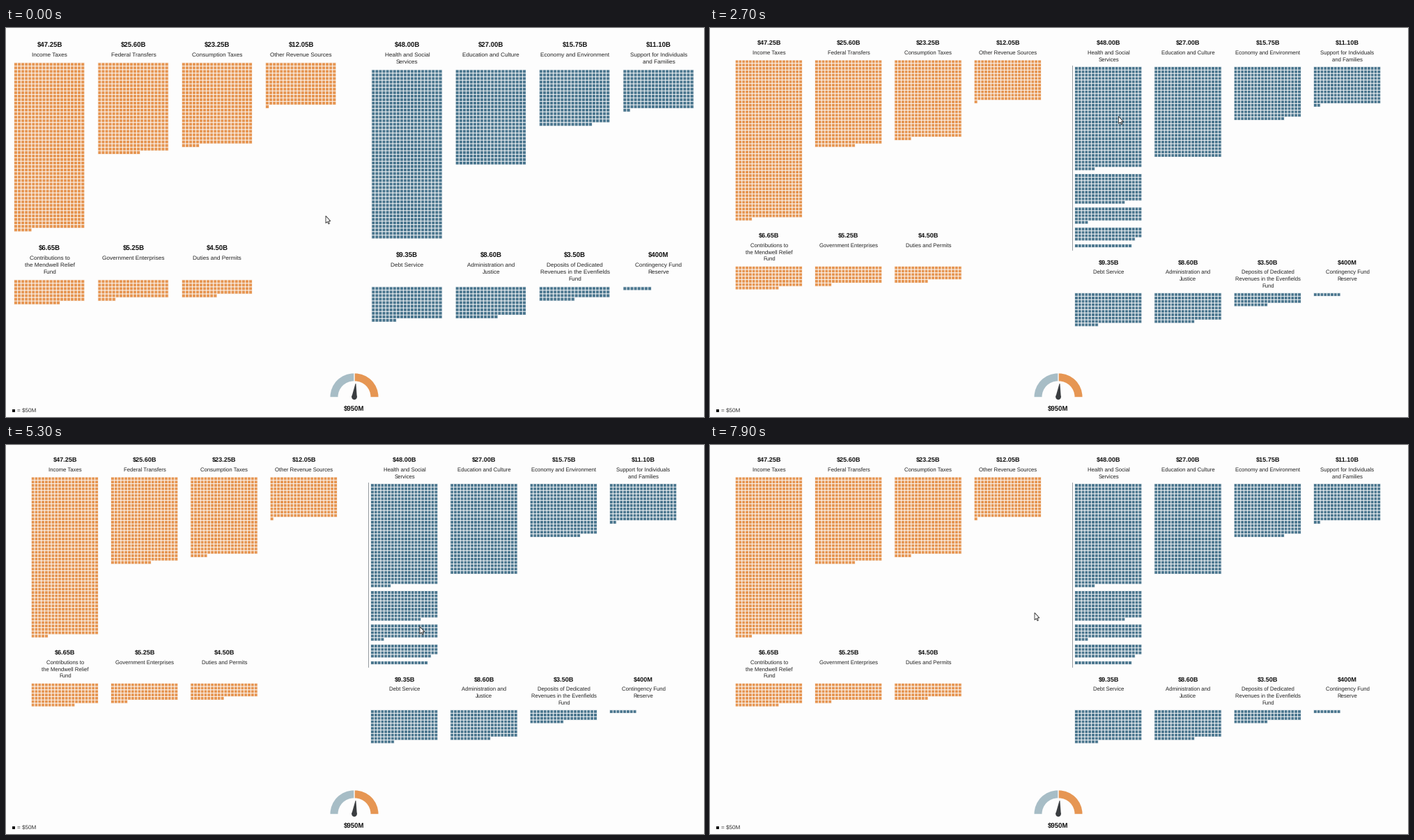
A matplotlib script for the animation above (8000 ms loop, 1002 by 559 pixels).

```python
import numpy as np
import matplotlib.pyplot as plt
from matplotlib.animation import FuncAnimation
from matplotlib.collections import PolyCollection
from matplotlib.patches import Circle, FancyBboxPatch, Polygon, Rectangle, Wedge

W, H, DPI = 1002, 559, 64
PX = 72 / DPI
STEP, LOOP = 100, 8000
COLS = 20

BG, ORANGE, BLUE, PALE = "#fdfdfd", "#e69653", "#4c778f", "#a7bdc6"
GREY, DARK, TIP = "#a8a7aa", "#3a3d40", "#212326"

plt.rcParams["font.family"] = "Liberation Sans"
plt.rcParams["text.hinting"] = "none"

# (amount, squares, label lines) for each row of each side
LEFT = [
    [("$47.25B", 945, ["Income Taxes"]),
     ("$25.60B", 512, ["Federal Transfers"]),
     ("$23.25B", 465, ["Consumption Taxes"]),
     ("$12.05B", 241, ["Other Revenue Sources"])],
    [("$6.65B", 133, ["Contributions to", "the Mendwell Relief", "Fund"]),
     ("$5.25B", 105, ["Government Enterprises"]),
     ("$4.50B", 90, ["Duties and Permits"])],
]
RIGHT = [
    [("$48.00B", 960, ["Health and Social", "Services"]),
     ("$27.00B", 540, ["Education and Culture"]),
     ("$15.75B", 315, ["Economy and Environment"]),
     ("$11.10B", 222, ["Support for Individuals", "and Families"])],
    [("$9.35B", 187, ["Debt Service"]),
     ("$8.60B", 172, ["Administration and", "Justice"]),
     ("$3.50B", 70, ["Deposits of Dedicated", "Revenues in the Evenfields", "Fund"]),
     ("$400M", 8, ["Contingency Fund", "Reserve"])],
]
# side data, colour, x before/after zoom, amount y before/after zoom per row
SIDES = [
    (LEFT, ORANGE, (12.0, 36.7), [(23.7, 21.2), (315.5, 298.2)]),
    (RIGHT, BLUE, (525.3, 524.0), [(23.7, 21.2), (325.5, 336.7)]),
]
PITCH, STRIDE = (5.06, 4.81), (120.35, 114.3)

SECTIONS = [606, 175, 84, 78, 17]
STARTS = np.cumsum([0] + SECTIONS[:-1])
TIPS = {0: ("Health and Social Services Institutions ($30.30B)", 170),
        3: ("Others ($3.90B)", 61)}

# start and length of the split, the zoom and the slide of the lower row
SPLIT, ZOOM, SLIDE = (1790, 750), (1950, 800), (1900, 840)

# time, x, y of the pointer
PATH = np.array([
    (0, 459, 270), (500, 459, 270), (1300, 586, 127), (4100, 587, 127),
    (5300, 594, 261), (5900, 594, 290), (6700, 594, 290), (7500, 466, 241),
    (LOOP, 466, 241)], float)


def ease(t, start, length):
    x = np.clip((t - start) / length, 0, 1)
    return 4 * x**3 if x < 0.5 else 1 - 4 * (1 - x)**3


def lerp(pair, p):
    return pair[0] + (pair[1] - pair[0]) * p


def pointer(t):
    i = min(np.searchsorted(PATH[:, 0], t, side="right") - 1, len(PATH) - 2)
    a, b = PATH[i], PATH[i + 1]
    u = (t - a[0]) / (b[0] - a[0])
    return a[1:] + (b[1:] - a[1:]) * u * u * (3 - 2 * u)


def grid(n):
    k = np.arange(n)
    return np.column_stack([k % COLS, k // COLS]).astype(float)


def section_rows(q):
    """Top row of every section as the tall block splits apart."""
    heights = [-(-n // COLS) + 1 for n in SECTIONS]
    apart = np.cumsum([0] + heights[:-1])
    return lerp((STARTS // COLS, apart), q)


def split_grid(q):
    """Sections drift apart; each one's tail flies up to fill its first row."""
    still, flying = [], []
    for start, n, top in zip(STARTS, SECTIONS, section_rows(q)):
        c = start % COLS
        cells = grid(c + n)[c:]
        cells[n - c:] = lerp((cells[n - c:], grid(c)), q)
        cells[:, 1] += top
        still.append(cells[:n - c])
        flying.append(cells[n - c:])
    return np.concatenate(still + flying)


def squares(cells, x, y, s):
    corners = np.array([(0, 0), (1, 0), (1, 1), (0, 1)])
    return (cells[:, None, :] + corners) * s + (x - 0.4, y - 0.4)


def outline(n, x, y, s):
    full, rest = divmod(n, COLS)
    x0, y0 = x - 0.6, y - 0.6
    x1, y1 = x0 + COLS * s + 0.6, y0 + full * s + 0.6
    pts = [(x0, y0), (x1, y0), (x1, y1)]
    if rest:
        xm = x0 + rest * s + 0.6
        pts += [(xm, y1), (xm, y1 + s), (x0, y1 + s)]
    else:
        pts += [(x0, y1)]
    return pts


fig = plt.figure(figsize=(W / DPI, H / DPI), dpi=DPI, facecolor=BG)
ax = fig.add_axes([0, 0, 1, 1])
ax.set_xlim(0, W)
ax.set_ylim(H, 0)
ax.axis("off")


def text(x, y, s, size, **kw):
    return ax.text(x, y, s, fontsize=size * PX, va="baseline", **kw)


def cell_set(color):
    c = PolyCollection([], facecolor=color, edgecolor=BG, linewidth=0.78 * PX)
    c.set_snap(False)
    return ax.add_collection(c, autolim=False)


blocks = []
for side, (rows, color, _, _) in enumerate(SIDES):
    for r, row in enumerate(rows):
        depth = max(len(item[2]) for item in row)
        for col, (amount, n, lines) in enumerate(row):
            blocks.append(dict(
                side=side, row=r, col=col, n=n, depth=depth, cells=cell_set(color),
                amount=text(0, 0, amount, 9.65, weight="bold", ha="center", color="#111"),
                lines=[text(0, 0, s, 8.2, ha="center", color="#222") for s in lines]))
health = next(b for b in blocks if b["n"] == 960)

# legend
ax.add_patch(Rectangle((9.3, 547.5), 4.2, 4.2, color="#111", lw=0))
text(15.8, 552.3, "= $50M", 8.15, color="#333")

# gauge
ax.add_patch(Wedge((499.3, 530.2), 33.8, 180, 270, width=11, color=PALE, lw=0))
ax.add_patch(Wedge((500.7, 530.2), 33.8, 270, 360, width=11, color=ORANGE, lw=0))
ax.add_patch(Circle((500, 530.3), 3.8, color=DARK, lw=0))
ax.add_patch(Polygon([(496.2, 530), (501.6, 511), (502.4, 511), (503.8, 530.6)], color=DARK, lw=0))
text(500, 550.4, "$950M", 9.65, weight="bold", ha="center", color="#111")

rule, = ax.plot([], [], color="#8a9196", lw=0.9 * PX)
seams = [ax.plot([], [], color="white", lw=1.9 * PX, zorder=3)[0] for _ in SECTIONS[1:]]
frame_line = ax.add_patch(Polygon([(0, 0)], fill=False, ec="#33373b", lw=1.4 * PX,
                                  joinstyle="miter", zorder=4))
tip_box = ax.add_patch(FancyBboxPatch((0, 0), 1, 1, boxstyle="round,pad=0,rounding_size=2",
                                      fc=TIP, alpha=0.95, lw=0, zorder=5))
tip_arrow = ax.add_patch(Polygon([(0, 0)], fc=TIP, alpha=0.95, lw=0, zorder=5))
tip_text = text(0, 0, "", 7.6, color="white", zorder=6)
cursor = ax.add_patch(Polygon([(0, 0)], fc="white", ec="#333", lw=0.9 * PX, zorder=8))
ARROW = np.array([(0, 0), (0, 10.4), (2.4, 8.3), (4, 11.6), (5.4, 10.9), (3.9, 7.7), (6.8, 7.4)])


def place(b, p, row_p, q):
    _, _, xs, ys = SIDES[b["side"]]
    s = lerp(PITCH, p)
    x = lerp(xs, p) + b["col"] * lerp(STRIDE, p)
    y = lerp(ys[b["row"]], row_p[b["row"]])
    mid = x + 10 * s
    b["amount"].set_position((mid, y + 3.5))
    b["amount"].set_fontsize(1.905 * s * PX)
    for i, line in enumerate(b["lines"]):
        line.set_position((mid, y + (2.86 + 2 * i) * s + 2.9))
        line.set_fontsize(1.62 * s * PX)
    top = y + (3.25 + 2 * b["depth"]) * s
    cells = split_grid(q) if b is health else grid(b["n"])
    b["cells"].set_verts(squares(cells, x, top, s))
    return x, top, s


def show_tip(k, x, y):
    label, width = TIPS[k]
    tip_box.set_bounds(x, y - 8.2, width, 16.4)
    tip_arrow.set_xy([(x, y - 3), (x - 3.5, y), (x, y + 3)])
    tip_text.set_position((x + 3.2, y + 2.8))
    tip_text.set_text(label)


def draw(i):
    t = i * STEP
    p, q, slide = ease(t, *ZOOM), ease(t, *SPLIT), ease(t, *SLIDE)
    for b in blocks:
        spot = place(b, p, (q, slide), q)
        if b is health:
            x, y, s = spot
    right = x + COLS * s
    cx, cy = pointer(t)
    cursor.set_xy(ARROW + (cx, cy))

    # whole block under the pointer, before it splits
    hover = x <= cx <= right and y <= cy <= y + 48 * s and t < SPLIT[0]
    health["cells"].set_facecolor(GREY if hover else BLUE)
    for seam, start in zip(seams, STARTS[1:]):
        row, c = divmod(start, COLS)
        ya, xm = y + row * s - 0.5, x + c * s - 0.5
        seam.set_data([x, xm, xm, right - 1], [ya + s, ya + s, ya, ya])
        seam.set_visible(hover)
    if hover:
        frame_line.set_xy(outline(960, x, y, s))

    rule.set_data([x - 4.2] * 2, [y - 2, y - 2 + 55 * s * q])
    rule.set_visible(q > 0)

    # one section under the pointer, after the zoom
    active = None
    if p == 1 and x <= cx <= right:
        for k, row in enumerate(section_rows(q)):
            top = y + row * s
            height = -(-SECTIONS[k] // COLS) * s
            if k in TIPS and top <= cy <= top + height:
                active = k
                frame_line.set_xy(outline(SECTIONS[k], x, top, s))
                show_tip(k, right + 4.8, top + height / 2)
    for part in (tip_box, tip_arrow, tip_text):
        part.set_visible(active is not None)
    frame_line.set_visible(hover or active is not None)
    return []


anim = FuncAnimation(fig, draw, frames=LOOP // STEP, interval=STEP, init_func=lambda: draw(0),
                     repeat=True, repeat_delay=0, blit=False)
plt.show()
```
